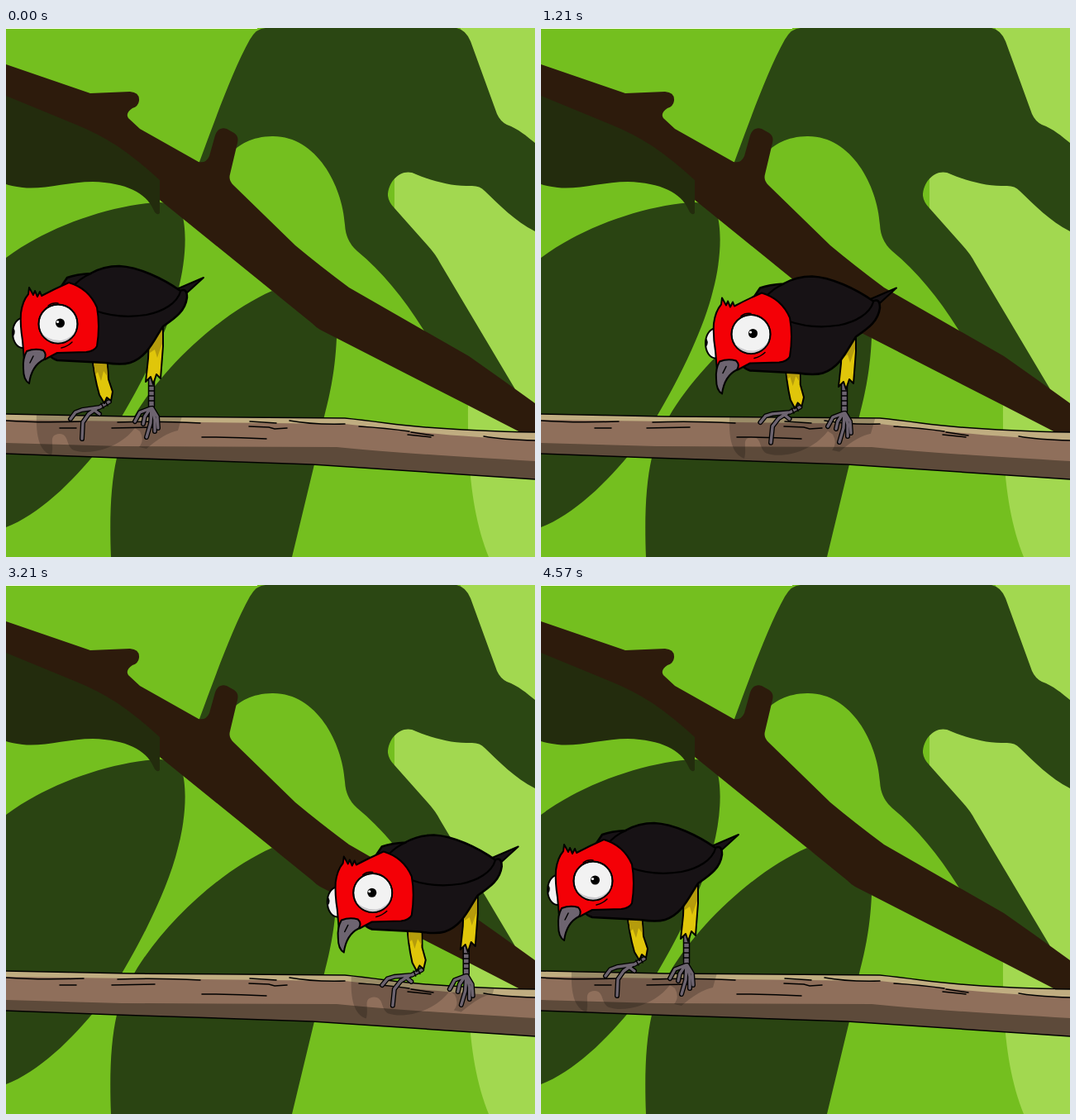
These frames come from a looping animation (640x640 px, 4.71 s). An HTML page:

```html
<!DOCTYPE html>
<html lang="en">
<head>
<meta charset="utf-8">
<title>Bird on a branch</title>
<style>
html, body { margin: 0; height: 100%; overflow: hidden; background: #74bf1f; }
svg { display: block; width: 100vw; height: 100vh; }
.ink { stroke: #000; stroke-width: 2; stroke-linejoin: round; stroke-linecap: round; }
.line { fill: none; stroke: #000; stroke-width: 1.5; stroke-linecap: round; }
.toes { fill: none; stroke: #000; stroke-width: 6; stroke-linejoin: round; stroke-linecap: round; }
.skin { stroke: #6d6470; stroke-width: 3.4; }
</style>
</head>
<body>
<svg viewBox="0 0 640 640">
  <defs>
    <path id="log" d="M0 467L150 470L410 472Q430 474 460 478Q530 487 640 489V546Q490 536 370 528L135 520L0 515z"/>
    <clipPath id="onLog"><use href="#log"/></clipPath>
    <clipPath id="inEye"><circle cx="63" cy="358" r="23.5"/></clipPath>
    <path id="toesL" d="M125 452L113 459L92 462L84 465L78 473M110 460L100 467L93 477L92 497M105 461L113 467"/>
    <path id="toesR" d="M175 460L162 465L156 476M174 461L168 470L166 479M176 460L175 478L170 495M177 460L180 474L180 488M177 460L183 470L184 484"/>
  </defs>

  <!-- foliage -->
  <path fill="#fff" d="M0 0H304V1H0z"/>
  <path fill="#a2d850" d="M550 0H640V640H584C566 595 558 540 559 457L470 230V170H560z"/>
  <path fill="#2b4713" d="M234 162C255 105 275 50 295 14Q303 0 314 0H545Q556 2 562 16L594 104Q598 113 606 117C620 122 630 131 640 139V246C615 233 598 215 579 197Q573 190 561 191C540 192 515 185 496 177C480 168 462 184 462 203Q463 211 470 218L510 263Q520 274 525 284L616 437L520 390L505 365C480 325 455 295 425 270Q411 258 410 238C407 190 375 130 322 131C298 131 280 142 272 152L250 190z"/>
  <g fill="#2a4412">
    <path d="M0 278C50 240 130 213 186 211Q208 212 212 222C220 245 217 285 208 318C198 360 170 420 140 470C105 525 50 585 0 604z"/>
    <path d="M127 640C125 590 127 550 134 520L155 470C190 410 260 345 322 318L400 375C398 420 390 450 385 470L373 528L346 640z"/>
  </g>
  <path fill="#232c0d" d="M0 75L140 130L186 180V224Q182 228 178 219C170 200 145 187 105 186C75 186 45 196 20 193Q5 191 0 189z"/>
  <path fill="#2d1b0c" d="M0 44L102 79L150 77Q162 78 161 88Q160 95 153 97Q144 103 148 109L162 122L233 162Q242 164 246 155L253 130Q257 119 267 122L276 127Q282 131 280 139L271 177Q269 184 275 190L350 263Q380 288 415 314L560 397Q600 425 640 454V492H628L560 457L380 365Q375 362 370 357L186 208V184Q160 160 135 143Q110 127 85 117L0 82z"/>

  <!-- perch -->
  <use href="#log" fill="#8f6f5b"/>
  <g clip-path="url(#onLog)">
    <path fill="#c0ad81" d="M0 460H640V499Q560 495 500 489L410 479L235 477L0 474z"/>
    <path fill="#5d4a3a" d="M0 502L140 506L400 507Q480 515 640 524V560H0z"/>
  </g>
  <path class="line" d="M0 467L150 470L410 472Q430 474 460 478Q530 487 640 489M0 515L135 520L370 528Q490 536 640 546"/>
  <path class="line" stroke-width="1.2" d="M0 475Q40 478 94 476M65 484H85M128 484L180 483M135 477Q180 475 235 478M237 495Q275 495 315 497M295 476L327 478M294 482L318 483L325 485L340 484M343 475Q370 480 410 479M427 482Q460 484 488 488M486 492L514 495M490 489L517 493M578 494Q600 498 640 499"/>

  <g clip-path="url(#onLog)">
    <path id="shadow" opacity=".2" d="M37 466C36 490 39 512 55 517C59 503 50 492 65 491C77 492 72 506 82 511C100 517 136 510 156 484L162 488Q168 499 161 507L170 509Q192 490 208 487L214 466z"/>
  </g>

  <g id="bird">
    <g id="legs">
      <g id="legL">
        <g id="footL">
          <use href="#toesL" class="toes"/><use href="#toesL" class="toes skin"/>
          <path class="line" d="M120 451L123 457M115 454L118 460"/>
        </g>
        <path class="ink" fill="#e0c60a" d="M104 395H122L124 425L129 440L127 451L122 447L119 454L113 444C109 430 106 418 104 395z"/>
        <path fill="#b59c0c" d="M105 395H121L123 422L118 415L115 427L111 416L108 420z"/>
      </g>
      <g id="legR">
        <path class="line" stroke-width="8" style="stroke-width:8.5" d="M176 424V457"/>
        <path class="line" style="stroke:#6d6470;stroke-width:5.5" d="M176 424V458"/>
        <path class="line" d="M173 433H179M173 439H179M173 445H179M173 451H179"/>
        <use href="#toesR" class="toes"/><use href="#toesR" class="toes skin"/>
        <path class="ink" fill="#e0c60a" d="M174 350H190V385L187 424L182 419L178 431L175 422L169 428L172 400z"/>
        <path fill="#b59c0c" d="M175 350H189V382L186 390L183 399L180 389L174 393z"/>
      </g>
    </g>
    <g id="body">
      <path class="ink" fill="#171215" d="M204 317L239 302L216 323z"/>
      <path class="ink" style="stroke-width:2.5" fill="#171215" d="M55 330L74 302Q85 298 102 297Q118 288 137 288C160 289 190 303 211 318Q219 314 219 326C217 342 206 350 190 361C180 375 172 398 150 405Q140 408 120 405L62 402Q50 398 53 390z"/>
      <path class="line" style="stroke-width:2.2" d="M80 314Q90 302 103 297M211 319C207 333 190 343 170 347C145 351 125 348 108 342"/>
      <ellipse class="ink" fill="#f2f2f2" cx="20" cy="369" rx="12" ry="18"/>
      <path d="M8 362Q13 367 9 373z"/>
      <path class="ink" fill="#f40006" d="M18 345Q20 330 27 322L28 314L33 323L35 318L38 325L41 319L43 324Q58 316 76 308Q100 315 110 338Q114 360 110 385Q107 391 97 392L62 393L47 401L22 402L20 378Q17 360 18 345z"/>
      <circle class="ink" fill="#f2f2f2" cx="63" cy="358" r="23.5"/>
      <path clip-path="url(#inEye)" fill="#c9c9cd" d="M38 364Q50 379 67 378Q80 376 88 360V385H38z"/>
      <path class="line" d="M51 336Q56 332 63 333M67 387Q75 385 80 380"/>
      <circle class="line" cx="63" cy="358" r="23.5"/>
      <g id="pupil"><circle cx="65.5" cy="357" r="5.5"/><circle cx="62.5" cy="355.5" r="1.6" fill="#fff"/></g>
      <path class="ink" fill="#6d6470" d="M25 391Q35 387 45 390Q50 395 46 401C36 406 30 415 28 430Q21 426 21 412Q20 400 25 391z"/>
      <path class="line" d="M29 405L33 397"/>
    </g>
  </g>
</svg>
<script>
const LOOP = 4710, STEP = 500 / 7, LAST = 64;

// step, x, body y, leg y, look left, airborne
const keys = [
  [0, 0, 0, 0, 0, 0],
  [8, 95, 2.5, 2.5, 0, 0],
  [16, 186, 6, 5, 0, 0],
  [17, 191, 12.5, 6, 0, 0],
  [24, 150, 5, 4, 0, 0],
  [25, 162, 11.5, 5, 0, 0],
  [32, 206, 8, 7, 0, 0],
  [35, 262, 9, 9.5, 0, 0],
  [40, 382, 13, 13, 0, 0],
  [44, 381, 15, 13, 0, 0],
  [48, 380, 13, 13, 1, 0],
  [53, 382, 14, 13, 1, 0],
  [55, 309, -25, -25, 1, 1],
  [56, 264, -41, -41, 1, 1],
  [58, 163, -31, -31, 1, 1],
  [60, 55, -6, -6, .5, .6],
  [62, 0, 0, 0, 0, 0],
  [LAST, 0, 0, 0, 0, 0]
];

function pose(step) {
  const n = Math.max(1, keys.findIndex(k => k[0] >= step));
  const a = keys[n - 1], b = keys[n];
  const u = (step - a[0]) / (b[0] - a[0]);
  return a.map((v, i) => v + (b[i] - v) * u);
}

function set(id, transform) {
  document.getElementById(id).setAttribute('transform', transform);
}

function draw() {
  const time = performance.now() % LOOP;
  const step = Math.min(LAST, Math.floor((time + 5) / STEP));
  const [, x, bodyY, legY, look, air] = pose(step);
  const lean = step > 0 && step < 54 ? 3 : 0;
  set('bird', `translate(${x})`);
  set('body', `translate(0 ${bodyY})`);
  set('legs', `translate(0 ${legY})`);
  set('legL', `rotate(${lean} 113 402)`);
  set('footL', `rotate(${-40 * air} 124 452)`);
  set('legR', `rotate(${-10 * air} 182 362)`);
  set('pupil', `translate(${-14 * look} ${3 * look})`);
  set('shadow', `translate(${x} ${x * .02})`);
  requestAnimationFrame(draw);
}
draw();
</script>
</body>
</html>
```
